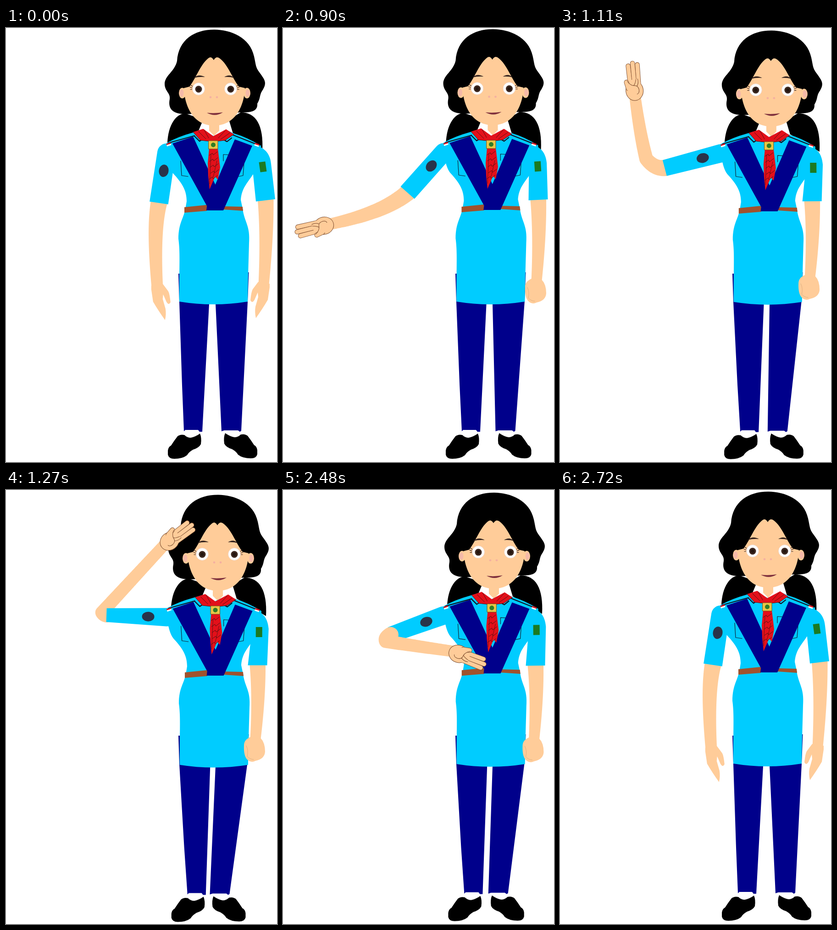
An HTML page with a canvas that plays this animation: 591 px wide and 947 px high, repeating every 2.96 s.

```html
<!DOCTYPE html>
<html lang="en">
<head>
<meta charset="utf-8">
<title>Salute</title>
<style>
html, body { margin: 0; width: 100%; height: 100%; overflow: hidden; background: #fff; }
canvas { display: block; }
</style>
</head>
<body>
<canvas id="stage" width="591" height="947"></canvas>
<script>
const ctx = document.getElementById('stage').getContext('2d');
const SKIN = '#ffcc99', CYAN = '#00ccff', NAVY = '#00008b', RED = '#e3101a', LINE = '#7a4a2c';

// Pose channels, one value per key step; angles in degrees, clockwise from +x.
const KEYS = [0, 1, 5, 12, 13, 19, 22];
const POSE = {
  headX:    [0, 1, 6, 8, 8, 4, 0],
  bodyY:    [0, -.3, -1.7, 7, 5.7, -1, 0],
  footL:    [0, .7, 3.2, 7.7, 7.7, 7, 0],
  footR:    [0, -2, -11, -25.5, -25.5, -19, 0],
  sleeveA:  [98.6, 110.5, 152.8, 182, 181.2, 138.7, 98.6],
  sleeveL:  [111, 114, 122, 131, 134, 111, 111],
  sleeveW:  [20.5, 20.5, 20, 15, 15, 20, 20.5],
  elbowA:   [99.8, 113, 156.2, 182.6, 179.5, 137.8, 99.8],
  elbowL:   [170, 182, 188, 145, 143, 162, 170],
  foreA:    [86, 111, 225, 312.8, 329.3, 406.5, 446],
  foreL:    [125, 110, 124, 203, 183, 138, 125],
  bend:     [1, 1, 1, .1, .15, .55, 1],
  foreW:    [18, 18, 19, 16, 16, 18, 18],
  handA:    [86, 111, 221, 323, 352, 410, 446],
  cuffX:    [566, 562.5, 550.5, 548.5, 549, 552, 566],
  cuffY:    [376, 375, 375, 382.5, 383, 383.5, 376],
  wristX:   [562, 560, 546, 544, 545, 550, 562],
  wristY:   [560, 559, 543, 543, 543, 545, 560]
};

const mix = (a, b, k) => a + (b - a) * k;
const mixP = (a, b, k) => [mix(a[0], b[0], k), mix(a[1], b[1], k)];
const rad = deg => deg * Math.PI / 180;
const polar = ([x, y], deg, len) => [x + Math.cos(rad(deg)) * len, y + Math.sin(rad(deg)) * len];

function stepAt(t) {
  if (t < 820) return 0;
  if (t < 1270) return Math.min(11, 1 + Math.floor((t - 820) / 40));
  if (t < 2360) return 12;
  return Math.min(22, 13 + Math.floor((t - 2360) / 40));
}

function poseAt(step) {
  let i = 0;
  while (i < KEYS.length - 2 && step > KEYS[i + 1]) i++;
  const k = (step - KEYS[i]) / (KEYS[i + 1] - KEYS[i]);
  const pose = {};
  for (const name in POSE) pose[name] = mix(POSE[name][i], POSE[name][i + 1], k);
  return pose;
}

function fill(path, color) {
  ctx.fillStyle = color;
  ctx.fill(new Path2D(path));
}
function line(path, width, color) {
  ctx.lineWidth = width;
  ctx.strokeStyle = color;
  ctx.lineCap = ctx.lineJoin = 'round';
  ctx.stroke(new Path2D(path));
}
function oval(x, y, rx, ry, color, edge) {
  ctx.beginPath();
  ctx.ellipse(x, y, rx, ry, 0, 0, 7);
  ctx.fillStyle = color;
  ctx.fill();
  if (edge) {
    ctx.lineWidth = 1;
    ctx.strokeStyle = edge;
    ctx.stroke();
  }
}
function at(x, y, deg, draw, flip = 1) {
  ctx.save();
  ctx.translate(x, y);
  ctx.rotate(rad(deg));
  ctx.scale(flip, 1);
  draw();
  ctx.restore();
}

// Tapered limb from a to b; bend 0 gives a sharp corner at e, 1 a smooth curve.
function limb(a, e, b, bend, r0, r1) {
  ctx.fillStyle = SKIN;
  ctx.beginPath();
  for (let i = 0; i <= 160; i++) {
    const s = i / 160;
    const sharp = s < .5 ? mixP(a, e, 2 * s) : mixP(e, b, 2 * s - 1);
    const curve = mixP(mixP(a, e, s), mixP(e, b, s), s);
    const [x, y] = mixP(sharp, curve, bend), r = mix(r0, r1, s);
    ctx.moveTo(x + r, y);
    ctx.arc(x, y, r, 0, 7);
  }
  ctx.fill();
}

function openHand() {
  fill('M-13,-2 L-13,6 L-9,33 Q2,52 17,73 Q20,60 18,48 L12,27 L13,17 L20,33 Q25,42 29,34 Q27,15 24,10 L12,-6Z', SKIN);
}

function saluteHand() {
  const finger = path => { line(path, 10.5, LINE); line(path, 8.8, SKIN); };
  finger('M12,-8 L55,-9');
  finger('M12,10 L56,11');
  finger('M12,1 L60,1');
  oval(0, 0, 21.5, 19, SKIN, LINE);
  fill('M2,-14 L24,-12 L25,13 L4,16Z', SKIN);
  finger('M6,-13 L20,-16');
  fill('M-8,-14 L12,-16 L18,-8 L0,2Z', SKIN);
  line('M22,-14 Q12,-8 11,0 Q11,9 1,10 Q-7,10 -8,5 M11,-1 Q15,3 24,5 M9,6 Q16,11 25,9', 1, LINE);
}

function fist() {
  fill('M-11,-4 Q-25,2 -25,14 Q-26,37 -18,45 Q-10,53 0,48 Q20,44 21,28 Q21,8 11,-2Z', SKIN);
  line('M-20,15 Q-15,25 -18,38 Q-12,45 -4,45', .8, '#d9a878');
}

function eye(x) {
  oval(x, 133, 13.5, 13.5, '#fff', '#f3d6c4');
  oval(x, 133.5, 7.5, 7.5, '#3d2820');
  oval(x, 133.5, 4, 4, '#24150f');
}

function head() {
  fill('M390,186 C362,190 350,228 352,264 L420,224 L430,200Z', '#000');
  fill('M512,184 C545,184 562,212 559,268 L495,230 L486,200Z', '#000');
  fill('M455,3.5 C412,3 376,25 373,72 C368,95 346,104 346,122 C346,138 359,142 357,155 C352,180 368,187 390,188 L520,184 C542,184 549,177 548,165 C556,152 552,146 560,135 C569,120 565,114 555,100 C544,85 546,85 541,62 C532,20 490,4 455,3.5Z', '#000');
  fill('M443,205 H465 V224 L454,235 L443,224Z', SKIN);
  for (const [x, inner] of [[384.5, 383], [525.5, 527]]) {
    oval(x, 142, 7.5, 11.5, SKIN);
    oval(inner, 142, 4.5, 8, '#f5b9a8');
  }
  fill('M453,70 Q447,60 440,67 C424,80 413,112 400,128 L388,131 C389,165 405,213 454,213 C503,213 520,165 521,131 L508,128 C495,112 484,80 467,67 Q459,60 453,70Z', SKIN);
  fill('M409,109 Q420,99 434,107 Q421,106 409,109Z M498,109 Q488,99 476,107 Q488,106 498,109Z', '#33221d');
  line('M408,128 L402,124 M407,131 L401,129 M407,134 L402,134 M502,128 L507,124 M503,131 L509,129 M503,134 L508,134', 1.2, '#33221d');
  eye(420);
  eye(490);
  oval(446, 151, 2.4, 2.2, '#f5b0a0');
  oval(460, 151, 2.4, 2.2, '#f5b0a0');
  fill('M438,185 Q455,187 473,184 Q456,195 438,185Z', '#7d2f3c');
}

function shoe(x, y, flip) {
  const path = 'M0,36 Q1,28 7,25 Q14,14 21,5 Q27,0 36,2 Q42,8 50,8 Q60,6 70,-1 Q74,8 72,22 Q68,30 55,34 Q46,39 42,46 Q32,54 14,54 Q2,54 0,45Z';
  at(x, y, 0, () => fill(path, '#000'), flip);
}

function legs(p, drop) {
  const l = p.footL, r = p.footR, y = 880 + drop;
  fill(`M376,536 L378,598 L${384 + l * .6},780 L${388 + l},${y} l3,-3 h28 l3,4 h6 L${443 + l * .3},602 V536Z`, NAVY);
  fill(`M457,536 V602 L${470 + r},${y} l6,-2 h30 l4,3 l3,-2 L${527 + r * .03},598 L529.5,533Z`, NAVY);
  shoe(353 + l, 886 + drop, 1);
  shoe(548 + r, 885 + drop, -1);
}

function skirt(dx, dy, drop) {
  ctx.save();
  const scale = (205 + drop - dy) / 205;
  ctx.translate(dx, 603 + drop - 603 * scale);
  ctx.scale(1, scale);
  fill('M391,394 C388,415 376,425 376,460 C380,490 378,510 378,597 Q452,609 527,597 C528,530 529,510 530,470 C533,430 520,425 516,394Z', CYAN);
  ctx.restore();
}

function torso() {
  fill('M425,223 L408,228 Q375,237 350,251 L348,275 C354,285 354,306 366,319 C385,340 394,355 394,378 L390,402 L517,399 L512,375 C514,350 525,340 539,319 L556,290 L556,257 Q525,238 497,230 L482,223 L454,236Z', CYAN);
  fill('M389,391 L438,386 V399 L389,403Z M474,389 L516,390 L517,399 L474,396Z', '#a0522d');
}

function uniform(shift) {
  line('M381,290 L383,322 L397,324 M474,290 V276 L490,277 M519,295 L517,322 L507,324', 1.2, '#123');
  fill('M363,252 L408,237 L458,345 L439,390Z', NAVY);
  fill('M499,243 L537,257 L474,398 H437 L439,382Z', NAVY);
  line('M354,251 L411,235 M411,236 L422,247 L436,238 M552,256 L494,233 M492,240 L482,248 L468,240', 2.2, '#112');
  at(355, 254, -18, () => { fill('M-5,-3 H5 V0 H-5Z', RED); fill('M-5,0 H5 V3 H-5Z', '#fff'); });
  at(547, 255, 18, () => { fill('M-5,-3 H5 V0 H-5Z', RED); fill('M-5,0 H5 V3 H-5Z', '#fff'); });
  at(shift, 0, 0, () => {
    fill('M408,227 L430,220 L452,236 L480,221 L497,232 L478,245 L461,247 H443 L424,245Z', RED);
    line('M408,227 L424,245 L443,247 M497,232 L478,245 L461,247 M432,222 L442,240 M420,226 L436,242 M478,224 L463,240 M488,229 L468,243', 1, '#511');
    fill('M443,263 H462 L467,304 L462,331 L456,324 L444,352 L441,322 L440,295Z', RED);
    for (let y = 272; y < 330; y += 13) line(`M${443 + y % 4},${y + 6} l7,-5 l2,4 l9,-7`, 1, '#511');
    line('M460,290 L452,325 M447,275 L444,340', .8, '#511');
    fill('M442,246 H462 V264 H442Z', '#eac546');
    line('M442,246 H462 V264 H442Z', 1, '#6b5518');
    oval(452, 255, 5, 5, '#2f7d25');
  });
}

function sleeveLeft(s, p) {
  at(s[0], s[1], p.sleeveA, () => {
    const n = p.sleeveL, w = p.sleeveW;
    fill(`M0,20 A20,20 0 0 1 0,-20 L${n},${-w} V${w}Z`, CYAN);
    oval(40, 0, 13.5, 10.5, '#29344a');
  });
}

function sleeveRight(p) {
  const { cuffX: x, cuffY: y, bodyY: dy } = p, lean = (x - 549) / 17;
  const edge = 578 + (x - 566) * .3;
  fill(`M536,${254 + dy} C558,${257 + dy} ${edge - 2},${270 + dy} ${edge},${296 + dy} L${x + 21},${y - 2.5 * lean} L${x - 21},${y + 2.5 * lean} L${534 + 5 * lean},${320 + dy}Z`, CYAN);
  at(560 + (x - 566) * .47, 303 + dy, -8 * lean, () => fill('M-7,-11 H7 V11 H-7Z', '#1b7a22'));
}

function draw(step) {
  const p = poseAt(step), dy = p.bodyY, drop = Math.max(0, dy * .36);
  const open = step < 3 || step > 20;
  const shoulder = [350, 272 + dy * .8];
  const cuff = polar(shoulder, p.sleeveA, p.sleeveL);
  const elbow = polar(shoulder, p.elbowA, p.elbowL);
  const wrist = polar(elbow, p.foreA, p.foreL);
  const armInFront = step > 12 && step < 18;

  function forearm() {
    limb(cuff, elbow, wrist, p.bend, p.foreW, 12.5);
    if (open) return at(...wrist, p.handA - 86, openHand);
    at(...polar(wrist, p.handA, 17), p.handA, saluteHand);
  }

  ctx.clearRect(0, 0, 591, 947);
  at(p.headX, dy, 0, head);
  legs(p, drop);
  skirt(p.headX * .12, dy, drop);
  at(p.headX * .12, dy, 0, torso);

  const { cuffX, cuffY, wristX, wristY } = p;
  limb([cuffX, cuffY - 5], [(cuffX + wristX) / 2 + 6, 450], [wristX, wristY], 1, 17.5, 11.5);
  at(wristX, wristY, 0, open ? openHand : fist, open ? -1 : 1);
  sleeveRight(p);

  if (!armInFront) forearm();
  sleeveLeft(shoulder, p);
  at(p.headX * .08, dy, 0, () => uniform(p.headX * .48));
  if (armInFront) forearm();
}

function tick(now) {
  draw(stepAt(now % 2960));
  requestAnimationFrame(tick);
}
tick(0);
</script>
</body>
</html>
```
